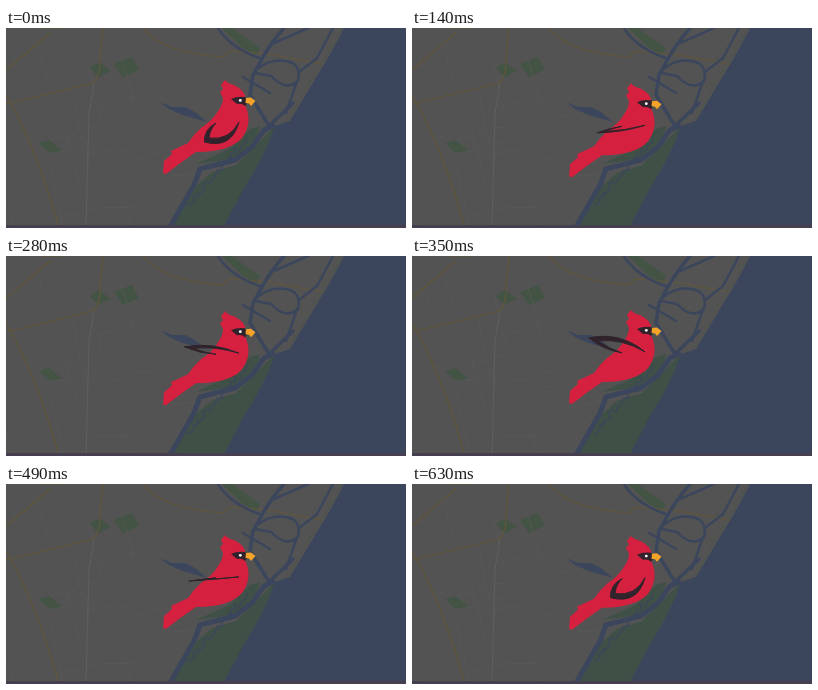
Recreate the animation shown at these times as an HTML page with a canvas. Size 400 by 200 pixels, loop 0.7 s.

```html
<!DOCTYPE html>
<html lang="en">
<head>
<meta charset="utf-8">
<title>Cardinal over the coast</title>
<style>
html, body { margin: 0; width: 100%; height: 100%; overflow: hidden; background: #535353; }
canvas { display: block; }
</style>
</head>
<body>
<canvas id="stage" width="400" height="200"></canvas>
<script>
const ctx = document.getElementById('stage').getContext('2d');
const STEP = 70, STEPS = 10;
const LAND = '#535353', LANE = '#595959', AVENUE = '#5f5f5f', ROAD = '#62563a';
const SEA = '#3b465d', GREEN = '#3f5046', PARK = '#435445';
const RED = '#d5203f', DARK = '#30232b', BEAK = '#f5a328';

const mix = (a, b, k) => a + (b - a) * k;

let seed = 7;
function rand() {
  seed = (seed * 16807) % 2147483647;
  return seed / 2147483647;
}

function fill(g, color, d) {
  g.fillStyle = color;
  g.fill(new Path2D(d));
}
function line(g, color, width, d) {
  g.strokeStyle = color;
  g.lineWidth = width;
  g.stroke(new Path2D(d));
}

// a line that wanders slightly between two points
function wander(g, color, width, x, y, x2, y2, sway) {
  const n = 6;
  let d = `M${x} ${y}`;
  for (let i = 1; i <= n; i++) {
    const s = i < n ? sway : 0;
    d += `L${mix(x, x2, i / n) + (rand() - .5) * s} ${mix(y, y2, i / n) + (rand() - .5) * s}`;
  }
  line(g, color, width, d);
}

function drawMap() {
  const c = document.createElement('canvas');
  c.width = 400;
  c.height = 200;
  const g = c.getContext('2d');
  g.lineCap = g.lineJoin = 'round';
  fill(g, LAND, 'M0 0H400V200H0Z');

  // parks
  fill(g, PARK, 'M108 36L126 29L133 42L117 49ZM84 40L93 34L105 43L92 49Z');
  fill(g, PARK, 'M33 115L43 112L56 122L45 126ZM216 0H226L254 20L250 27L237 20Z');

  // lanes in two crossing directions
  for (let i = 0; i < 18; i++) {
    const x = rand() * 180, y = rand() * 190;
    const across = i % 2, reach = 30 + rand() * 50;
    wander(g, LANE, .7, x, y, x + (across ? reach : 15), y + (across ? -12 : reach), 5);
  }
  line(g, AVENUE, 1, 'M88 55L83 85L80 200');

  // highways
  line(g, ROAD, 1.2, 'M0 67Q31 120 53 200M0 76L42 66L87 55Q95 48 94 29L97 0M36 0L57 0');
  line(g, ROAD, 1.2, 'M137 0Q150 15 170 21T217 29L223 23L262 26L322 37M0 42L44 5');

  // ocean and barrier islands
  fill(g, SEA, 'M338 0H400V200H216Q238 158 256 126L269 98L284 93Q302 63 314 43Q326 24 338 0Z');
  fill(g, GREEN, 'M164 200L190 158L205 145L230 137L269 98Q258 130 238 160L217 200Z');
  fill(g, GREEN, 'M190 136L223 121L244 101L254 98L250 114L236 128L213 133Z');
  line(g, '#4d5549', 1, 'M336 0Q322 28 309 45L283 92');

  // waterways
  line(g, SEA, 5, 'M164 199L188 157L194 141L229 132L246 119L258 102L267 98');
  line(g, SEA, 3.5, 'M278 0Q265 15 257 29L247 47L244 67L263 98L287 75');
  line(g, SEA, 2.5, 'M212 0Q224 20 256 31M250 42Q264 30 280 33T292 53Q280 64 265 48L249 45');
  line(g, SEA, 2.5, 'M293 44L311 30L327 0M291 53L280 85M268 15L302 0M237 49L264 65');
  fill(g, SEA, 'M154 74L166 79L179 79L189 84L201 94L187 90L174 86L163 81Z');
  for (let i = 0; i < 6; i++) {
    const x = 182 + i * 10, y = 178 - i * 11;
    wander(g, SEA, 1.2, x, y, x + 9, y - 14, 5);
  }

  fill(g, '#453f50', 'M0 197H400V200H0Z');
  return c;
}

// quadratic curve from p to q with its control point pushed sideways
function bow(p, q, push, end) {
  const dx = q.x - p.x, dy = q.y - p.y, len = Math.hypot(dx, dy);
  ctx.quadraticCurveTo((p.x + q.x) / 2 + dy / len * push, (p.y + q.y) / 2 - dx / len * push, end.x, end.y);
}

// lift 0: folded down, 1: fully raised
function drawWing(lift) {
  const root = { x: 233, y: 94 }, back = { x: 210, y: 95 };
  const angle = mix(150, 194, lift) * Math.PI / 180, reach = mix(40, 58, lift);
  const tip = { x: root.x + reach * Math.cos(angle), y: root.y + reach * Math.sin(angle) };
  const inner = {
    x: mix(tip.x, (root.x + back.x) / 2, .2),
    y: mix(tip.y, (root.y + back.y) / 2, .2)
  };
  const edge = mix(20, -14, lift);
  ctx.beginPath();
  ctx.moveTo(root.x, root.y);
  bow(root, tip, edge, tip);
  bow(tip, back, mix(7, -5, lift), back);
  bow(inner, back, mix(3, -2, lift), inner);
  bow(root, inner, edge + mix(-8, 6, lift), root);
  ctx.fillStyle = ctx.strokeStyle = DARK;
  ctx.lineWidth = 1;
  ctx.lineJoin = 'round';
  ctx.fill();
  ctx.stroke();
}

function drawBird(step) {
  const lift = Math.min(step / 5, (9 - step) / 4) ** .8;
  const bob = step < 6 ? 3.8 * Math.sin(Math.PI * step / 6) : -1.5 * (10 - step) / 4;
  ctx.save();
  ctx.translate(0, bob);
  fill(ctx, RED, 'M219 52Q222 56 228 57Q236 61 239 67L239 77Q244 87 242 97Q239 112 225 118' +
    'Q212 124 190 124Q175 134 160 146L157 145L158 133L166 126L165 123L182 115' +
    'Q188 106 195 100Q207 92 212 83Q217 76 217 70L214 64L217 61L215 57Z');
  fill(ctx, DARK, 'M225 71Q231 68 239 69L242 74L239 78Q236 75 231 76Z');
  fill(ctx, BEAK, 'M240 70L245 69.5L249.5 73L245 78L243 75.5L239.5 75Z');
  ctx.fillStyle = '#fff';
  ctx.beginPath();
  ctx.arc(234.3, 72.4, 1.4, 0, Math.PI * 2);
  ctx.fill();
  drawWing(lift);
  ctx.restore();
}

const map = drawMap();
const start = performance.now();
function frame() {
  const step = Math.floor((performance.now() - start) / STEP) % STEPS;
  ctx.drawImage(map, 0, 0);
  drawBird(step);
  requestAnimationFrame(frame);
}
frame();
</script>
</body>
</html>
```
